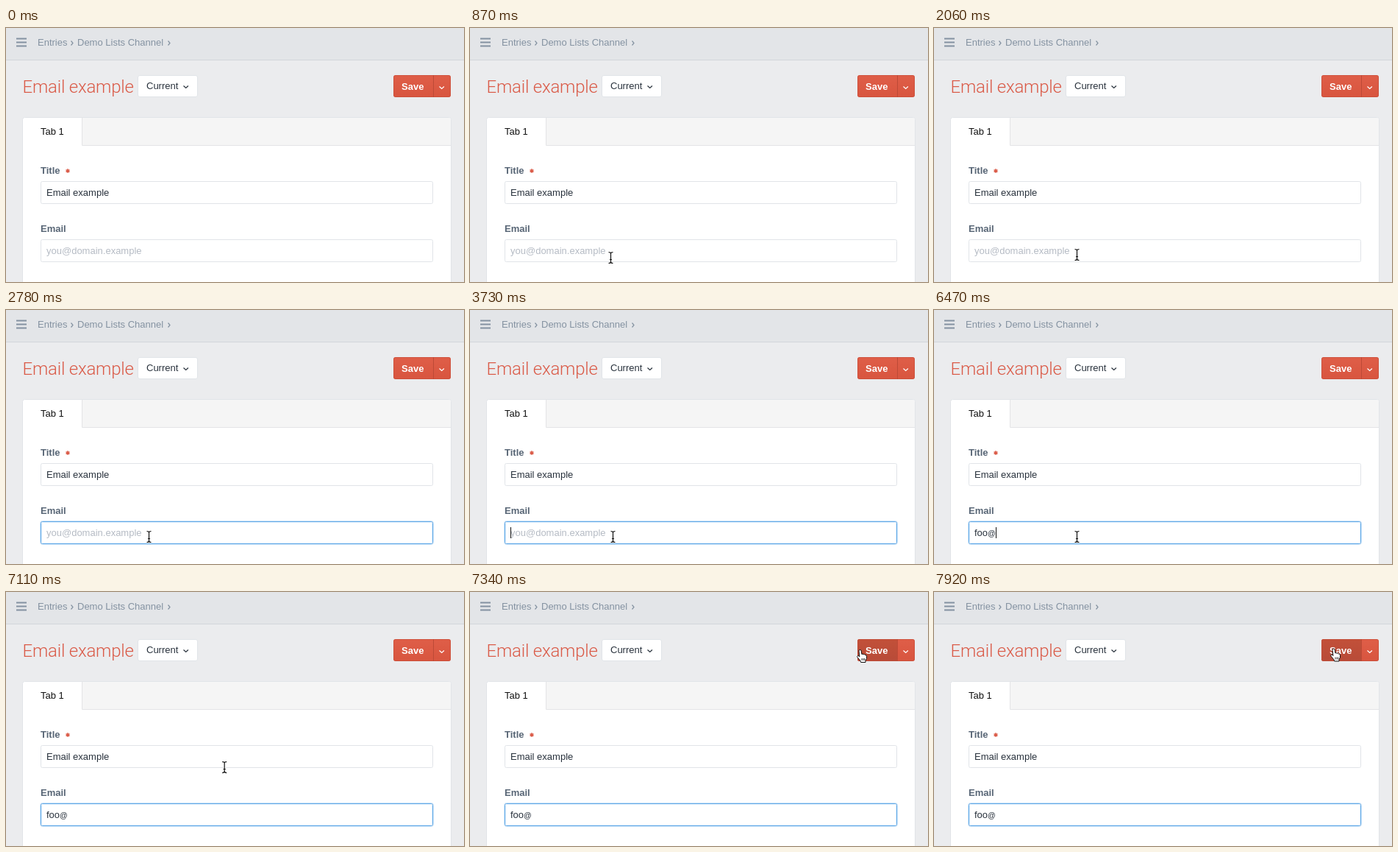
Write an HTML page that moves like this. It is 623 px wide and 345 px high and loops after 8 s.

```html
<!DOCTYPE html>
<html lang="en">
<head>
<meta charset="utf-8">
<title>Entry form</title>
<style>
  html, body { margin: 0; width: 100%; height: 100%; overflow: hidden; background: #ebecee; }
  svg { display: block; font: 13px "Liberation Sans", Arial, sans-serif; }
  .crumb { fill: #8492a1; }
  .label { fill: #576575; font-weight: bold; }
  .dark { fill: #29323d; }
  .heading { fill: #da5a47; font: 300 24px Roboto, sans-serif; letter-spacing: -.2px; }
  .box { fill: #fff; stroke: #e1e4e8; }
  .line { fill: none; stroke-width: 1.2; }
</style>
</head>
<body>
<svg width="623" height="345" viewBox="0 0 623 345">
  <defs>
    <linearGradient id="red" x2="0" y2="1">
      <stop stop-color="#df5e48"/><stop offset="1" stop-color="#d8553f"/>
    </linearGradient>
    <linearGradient id="darkRed" x2="0" y2="1">
      <stop stop-color="#c25039"/><stop offset="1" stop-color="#b84b38"/>
    </linearGradient>
  </defs>

  <rect width="623" height="345" fill="#ebecee"/>
  <rect width="623" height="43" fill="#e3e5e8"/>
  <rect y="43" width="623" height="1" fill="#d3d6da"/>
  <path d="M14 14.5h14M14 19.5h14M14 24.5h14" stroke="#8492a1" stroke-width="2.2"/>
  <g class="crumb">
    <text x="43" y="24">Entries</text>
    <text x="97" y="24">Demo Lists Channel</text>
    <path class="line" stroke="#8492a1" d="M88.5 17.5l2.5 3-2.5 3M220.5 17.5l2.5 3-2.5 3"/>
  </g>

  <text class="heading" x="22.500" y="88">Email example</text>
  <rect class="box" x="179.500" y="64.500" width="81" height="29" rx="2.500"/>
  <text class="dark" x="191" y="83">Current</text>
  <path class="line" stroke="#29323d" d="M241.500 78.500l3.200 3 3.200-3"/>

  <rect x="527" y="64" width="78" height="30" rx="3" fill="url(#red)"/>
  <path id="hover" d="M581 64h-51a3 3 0 0 0-3 3v24a3 3 0 0 0 3 3h51z" fill="url(#darkRed)"/>
  <rect x="527.500" y="64.500" width="77" height="29" rx="2.500" fill="none" stroke="#c54c38" stroke-opacity=".6"/>
  <path d="M581.500 64v30" stroke="#bd4a37"/>
  <text x="538" y="84" fill="#fff" font-weight="bold">Save</text>
  <path class="line" stroke="#fff" d="M589.500 79.500l3.200 3 3.200-3"/>

  <rect class="box" x="22.500" y="121.500" width="583" height="240" rx="3"/>
  <path d="M104 122h499a2 2 0 0 1 2 2v35H104z" fill="#f5f5f5"/>
  <path d="M103.500 122v37.500H605" fill="none" stroke="#e3e4e6"/>
  <text x="47" y="145" fill="#111">Tab 1</text>

  <text class="label" x="47" y="198">Title</text>
  <path d="M84 191.200v5.600M81.500 192.600l5 2.800M81.500 195.400l5-2.800" stroke="#da5a47" stroke-width="1.500"/>
  <rect class="box" x="47.500" y="208.500" width="533" height="30" rx="2"/>
  <text class="dark" x="55" y="228">Email example</text>

  <text class="label" x="47" y="277">Email</text>
  <rect class="box" x="47.500" y="287.500" width="533" height="30" rx="2"/>
  <g id="focus" fill="none">
    <rect x="46.500" y="286.500" width="535" height="32" rx="3" stroke="#cfe6fa"/>
    <rect x="47.500" y="287.500" width="533" height="30" rx="2" stroke="#62a9e6"/>
    <rect x="48.500" y="288.500" width="531" height="28" rx="1" stroke="#e5f2fd"/>
  </g>
  <text id="placeholder" x="55" y="307" fill="#b5bbc4">you@domain.example</text>
  <text class="dark" x="55" y="307"><tspan id="typed"></tspan><tspan id="at" font-size="10.500" dy="-.5">@</tspan></text>
  <rect id="caret" y="295" width="1" height="15" fill="#111"/>

  <g id="cursor">
    <g id="arrow">
      <path d="M0 0v14l3.300-3 2.200 5 2.300-1-2.200-4.800h4.400z" fill="#000" stroke="#fff"/>
    </g>
    <g id="beam" fill="none">
      <path id="beamShape" d="M-3-7.500q3 0 3 2v11q0 2-3 2M3-7.500q-3 0-3 2v11q0 2 3 2M-1.500 2.500h3" stroke="#fff" stroke-width="2.600"/>
      <use href="#beamShape" style="display:none"/>
      <path d="M-3-7.500q3 0 3 2v11q0 2-3 2M3-7.500q-3 0-3 2v11q0 2 3 2M-1.500 2.500h3" stroke="#111" stroke-width="1.200"/>
    </g>
    <g id="hand">
      <path d="M-1.500 1q0-1.500 1.500-1.500t1.700 1.500l.7 4.500q1.200-1 2.200.3 1.300-.8 2.200.6 2-.2 2.200 1.800v3.300l-1.500 2.500v2.500H1.200l-1-2.500-3.700-4.300q-.8-1.700.6-2.200 1.100-.2 2.300 1.500z" fill="#fff" stroke="#111"/>
      <path d="M2.500 11v3M4.500 11v3M6.300 11v3" stroke="#111" stroke-width=".8"/>
    </g>
  </g>
</svg>
<script>
const LOOP = 8000;
const byId = id => document.getElementById(id);
const show = (id, visible) => { byId(id).style.display = visible ? "" : "none"; };

// Pointer moves: first and last step time, number of steps, destination.
const start = [737, 418];
const moves = [
  [50, 230, 4, [245, 233]],
  [410, 870, 9, [191.5, 312]],
  [1410, 1470, 2, [192, 316]],
  [1830, 2060, 5, [194.5, 308]],
  [7057, 7340, 6, [530.5, 79]],
  [7400, 7510, 3, [543.5, 77.5]]
];
const keys = [[0, ""], [4380, "f"], [4740, "fo"], [4850, "foo"], [6470, "foo@"]];
const caretToggles = [2830, 3250, 3730, 4260, 4380, 5390, 5870, 6350, 6470, 7000, 7510, 7920];
const caretX = [55, 59, 66, 74, 84];

function pointerAt(t) {
  let [x, y] = start;
  for (const [from, to, steps, [endX, endY]] of moves) {
    if (t < from) break;
    const step = Math.min(steps, 1 + Math.floor((t - from) * (steps - 1) / (to - from) + 1e-6));
    const eased = 1 - (1 - step / steps) ** 2;
    x += (endX - x) * eased;
    y += (endY - y) * eased;
  }
  return [x, y];
}

function render(t) {
  const [x, y] = pointerAt(t);
  const overSave = x > 527 && x < 581 && y > 64 && y < 94;
  const overInput = x > 47 && x < 581 && (y > 208 && y < 239 || y > 287 && y < 318);
  byId("cursor").setAttribute("transform", `translate(${x} ${y})`);
  show("cursor", t >= 50);
  show("hand", overSave);
  show("beam", overInput);
  show("arrow", !overSave && !overInput);
  show("hover", overSave);

  const text = keys.findLast(([time]) => t >= time)[1];
  byId("typed").textContent = text.replace("@", "");
  show("at", text.includes("@"));
  show("placeholder", !text);
  show("focus", t >= 2780);
  show("caret", caretToggles.filter(time => t >= time).length % 2);
  byId("caret").setAttribute("x", caretX[text.length]);
}

function tick() {
  render(performance.now() % LOOP);
  requestAnimationFrame(tick);
}
tick();
</script>
</body>
</html>
```
